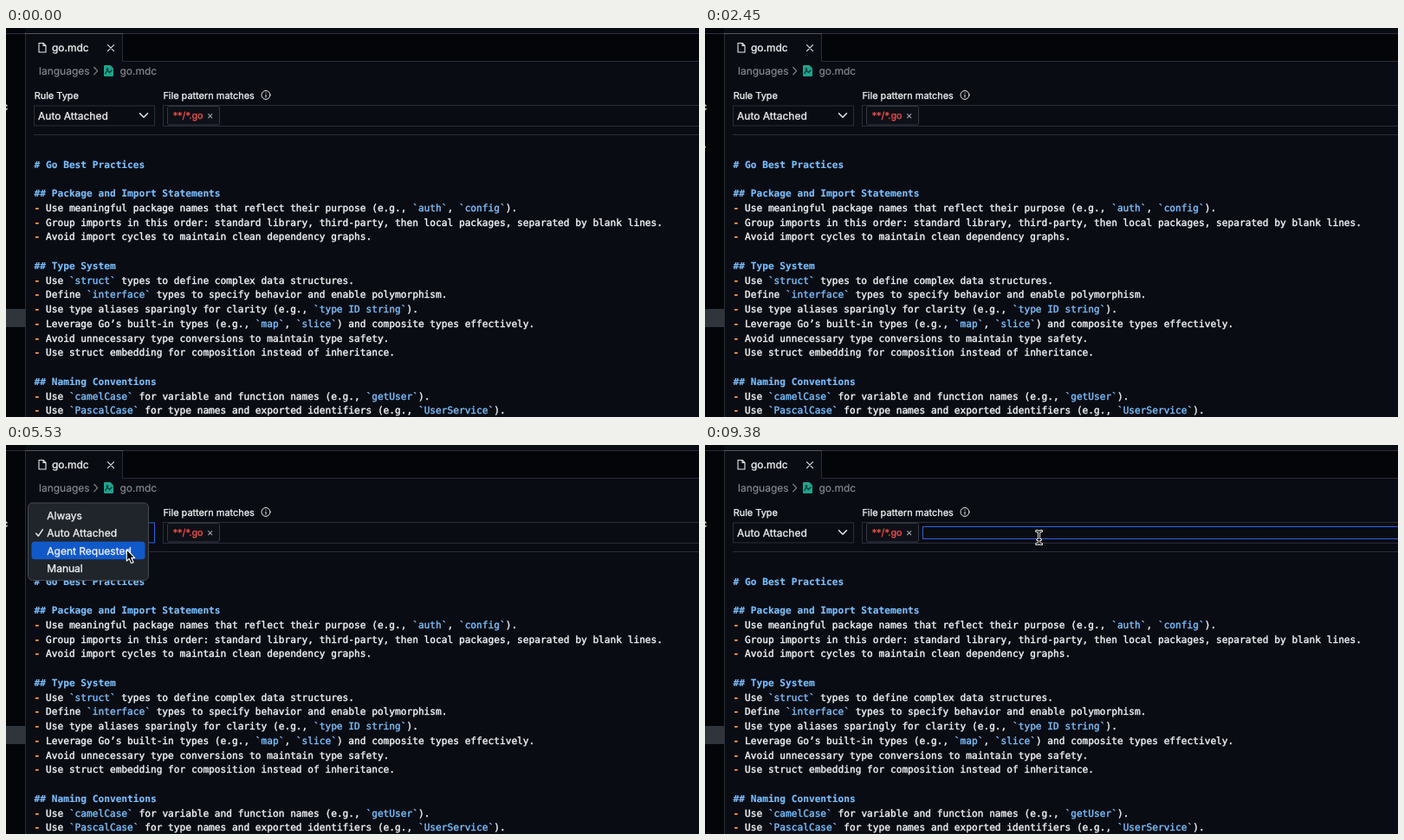
These frames come from a looping animation (800x450 px, 9.45 s). An HTML page:

```html
<!DOCTYPE html>
<html lang="en">
<head>
<meta charset="utf-8">
<style>
  html, body { margin: 0; width: 100%; height: 100%; overflow: hidden; background: #0a0c13; }
  svg { display: block; width: 100vw; height: 100vh; }
  text { text-rendering: geometricPrecision; white-space: pre; fill: #f0f3f6; stroke: #f0f3f6; stroke-width: .3; }
  .ui { font: 12px Inter, sans-serif; }
  .label { font-size: 10.95px; }
  .dim { fill: #858a94; stroke: #858a94; stroke-width: .15; }
  .chip { font-size: 10.8px; fill: #f34e48; stroke: #f34e48; }
  #code text { font: 11.17px "DejaVu Sans Mono", monospace; stroke-width: .4; }
  #code .head { font-weight: bold; fill: #7abdfb; stroke: #7abdfb; stroke-width: .15; }
  #code .lit { fill: #7abdfb; stroke: #7abdfb; }
  #code .dash { fill: #f5924a; stroke: #f5924a; stroke-width: .8; }
  .line { fill: none; stroke: #2a2e39; }
  .icon { fill: none; stroke: #e6e9ed; stroke-width: 1.1; stroke-linecap: round; stroke-linejoin: round; }
</style>
</head>
<body>
<svg viewBox="0 0 800 450" preserveAspectRatio="none">
  <rect width="800" height="450" fill="#0a0c13"/>

  <!-- sidebar and tab bar -->
  <rect width="22" height="450" fill="#030509"/>
  <rect x="135" y="7" width="665" height="31" fill="#030509"/>
  <rect y="325" width="22" height="21" fill="#30343b"/>
  <path class="line" d="M0 6.5H800M22.5 7V450M134.5 7V38.5H800"/>
  <path class="line" style="stroke:#50555f" d="M22 6.5H135"/>
  <text class="ui" x="-4.5" y="95">c</text>
  <g id="collapse" class="icon">
    <rect x="5" y="47.5" width="7.5" height="6.5" rx="1"/>
    <path d="M7.5 47V44.5H15.5V51H13M7 50.8H10.5"/>
  </g>
  <path class="icon" d="M38 17.5H43L46 20.5V28H38ZM43 17.5V20.5H46"/>
  <text class="ui" x="53" y="27">go.mdc</text>
  <path class="icon" d="M117.5 19.7L124.5 26.7M124.5 19.7L117.5 26.7"/>

  <!-- breadcrumb -->
  <text class="ui dim" x="38" y="53.7">languages</text>
  <path class="icon" style="stroke:#858a94" d="M101.7 45.5L105.7 49.7L101.7 53.9"/>
  <path fill="#1fa38b" d="M114 43H120.5L124 46.5V55Q124 56 123 56H114Q113 56 113 55V44Q113 43 114 43Z"/>
  <path d="M114.5 53L117 49L119.5 51.5L122.5 48.5" fill="none" stroke="#0a3c38" stroke-width="1.4"/>
  <circle cx="117" cy="47.5" r="1.3" fill="#0a3c38"/>
  <text class="ui dim" x="131.5" y="53.7">go.mdc</text>

  <!-- rule settings -->
  <text class="ui label" x="32.7" y="81.7">Rule Type</text>
  <text class="ui label" x="181.4" y="81.7">File pattern matches</text>
  <circle class="icon" cx="300" cy="77.5" r="5" style="stroke-width:1"/>
  <path class="icon" d="M300 77.2V80M300 75.1V75.2"/>
  <rect id="select" class="line" x="32.5" y="90" width="139" height="23"/>
  <text class="ui" x="37" y="105.9">Auto Attached</text>
  <path class="icon" style="stroke-width:1.5" d="M154.5 98.8L159 103.3L163.5 98.8"/>
  <rect class="line" x="181.5" y="89.5" width="640" height="24"/>
  <rect x="186.5" y="90.5" width="60" height="21.5" rx="2" fill="#0d1017" stroke="#343942"/>
  <text class="ui chip" x="192.7" y="105.2">**/*.go</text>
  <path class="icon" style="stroke:#a0a5ad" d="M233.6 99.6L237.8 103.8M237.8 99.6L233.6 103.8"/>
  <rect id="focus" x="251.5" y="94.5" width="570" height="14" fill="none" stroke="#2f60e6"/>
  <path class="line" d="M32 123.5H800"/>

  <g id="code"></g>

  <g id="menu">
    <rect x="25.5" y="67" width="139" height="89.5" rx="5" fill="#20252b" stroke="#464a50"/>
    <rect id="highlight" x="29.5" width="131" height="20.5" rx="3.5" fill="#1159c9"/>
    <path class="icon" style="stroke-width:1.5" d="M34.7 102.3L37.3 105.3L42.3 97.8"/>
  </g>

  <path id="arrow" d="M0 0V13.4L3 10.7L5.3 16L7.8 14.9L5.5 9.8H9.5Z"
        fill="#000" stroke="#fff" stroke-width="1.1" stroke-linejoin="round"/>
  <g id="beam" fill="none" stroke-linecap="round">
    <defs><path id="beamShape" d="M-3 -7.5Q0 -7.5 0 -5.5Q0 -7.5 3 -7.5M0 -5.5V5.5M-3 7.5Q0 7.5 0 5.5Q0 7.5 3 7.5M-1.8 2.5H1.8"/></defs>
    <use href="#beamShape" stroke="#fff" stroke-width="3"/>
    <use href="#beamShape" stroke="#000" stroke-width="1.2"/>
  </g>
</svg>
<script>
const LOOP = 9450, STEP = 70;
const MENU_OPEN = 3500, MENU_CLOSE = 6650, INPUT_FOCUS = 7700;
const ROW = 20.4, MENU_TOP = 71;
const $ = id => document.getElementById(id);

const lines = `# Go Best Practices

## Package and Import Statements
- Use meaningful package names that reflect their purpose (e.g., \`auth\`, \`config\`).
- Group imports in this order: standard library, third-party, then local packages, separated by blank lines.
- Avoid import cycles to maintain clean dependency graphs.

## Type System
- Use \`struct\` types to define complex data structures.
- Define \`interface\` types to specify behavior and enable polymorphism.
- Use type aliases sparingly for clarity (e.g., \`type ID string\`).
- Leverage Go’s built-in types (e.g., \`map\`, \`slice\`) and composite types effectively.
- Avoid unnecessary type conversions to maintain type safety.
- Use struct embedding for composition instead of inheritance.

## Naming Conventions
- Use \`camelCase\` for variable and function names (e.g., \`getUser\`).
- Use \`PascalCase\` for type names and exported identifiers (e.g., \`UserService\`).`.split('\n');

const span = (kind, text) => `<tspan class="${kind}">${text}</tspan>`;
$('code').innerHTML = lines.map((line, i) => {
  const markup = line[0] === '#' ? span('head', line)
    : line.replace(/`[^`]+`/g, word => span('lit', word)).replace(/^-/, span('dash', '-'));
  return `<text x="32.6" y="${161.6 + i * 16.75}">${markup}</text>`;
}).join('');

$('menu').insertAdjacentHTML('beforeend', ['Always', 'Auto Attached', 'Agent Requested', 'Manual']
  .map((name, i) => `<text class="ui" x="47.3" y="${85.7 + i * ROW}">${name}</text>`).join(''));

// Pointer path: [time, x, y]
const path = [
  [0, -20, 130], [2310, -20, 130], [3220, 151.7, 99.3], [3990, 151.7, 99.3],
  [4270, 140.3, 83.5], [4620, 140.3, 83.5], [5530, 139.3, 120.8], [5600, 139.3, 120.8],
  [5950, 139, 139], [6090, 139, 139], [6500, 140, 101], [6650, 140, 101],
  [7210, 323, 93], [7350, 323, 93], [7420, 328, 93.4], [7700, 372, 104],
  [7840, 372, 104], [8050, 385.6, 107], [LOOP, 385.6, 107]
];

function pointerAt(t) {
  const i = path.findIndex(key => key[0] > t);
  const [t0, x0, y0] = path[i - 1], [t1, x1, y1] = path[i];
  const u = (t - t0) / (t1 - t0), k = u * u * (3 - 2 * u);
  return [x0 + (x1 - x0) * k, y0 + (y1 - y0) * k];
}

const show = (id, on) => $(id).setAttribute('visibility', on ? 'visible' : 'hidden');

function draw(now) {
  const t = Math.floor((now % LOOP) / STEP) * STEP;
  const [x, y] = pointerAt(t);
  const menuOpen = t >= MENU_OPEN && t < MENU_CLOSE;
  const overInput = x > 182;
  const row = Math.max(0, Math.min(3, Math.floor((y - MENU_TOP) / ROW)));

  show('collapse', t >= 1050 && t < 2450);
  show('menu', menuOpen);
  show('focus', t >= INPUT_FOCUS);
  show('arrow', !overInput);
  show('beam', overInput);
  $('select').style.stroke = menuOpen ? '#2f60e6' : '';
  $('highlight').setAttribute('y', MENU_TOP + row * ROW);
  for (const id of ['arrow', 'beam']) $(id).setAttribute('transform', `translate(${x} ${y})`);
  requestAnimationFrame(draw);
}
requestAnimationFrame(draw);
</script>
</body>
</html>
```
